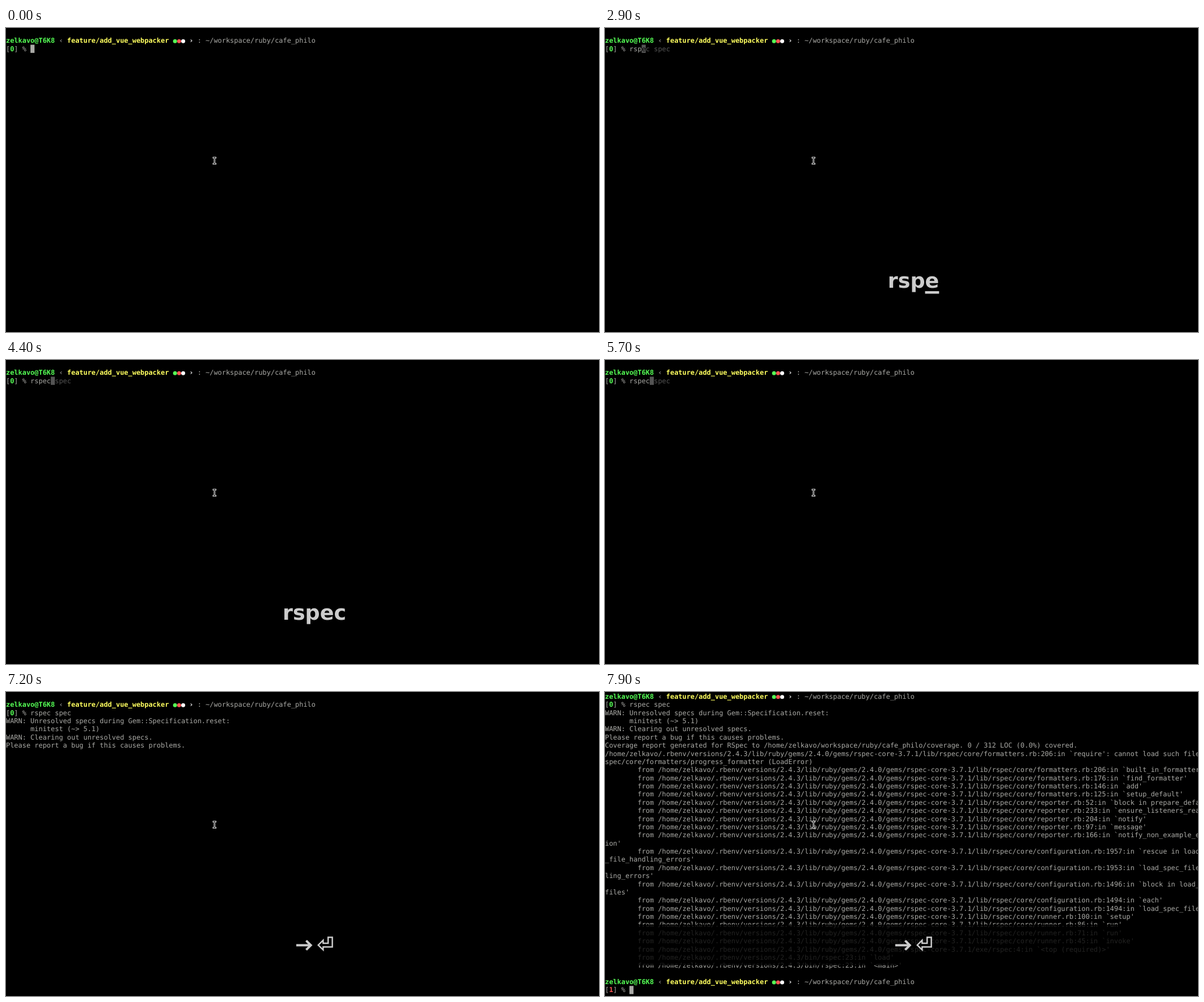
An HTML page with a canvas that plays this animation: 1046x536 px, repeating every 8 s.

```html
<!DOCTYPE html>
<html lang="en">
<head>
<meta charset="utf-8">
<title>Terminal session</title>
<style>
  html, body { margin: 0; width: 100%; height: 100%; overflow: hidden; background: #000; }
  canvas { display: block; }
</style>
</head>
<body>
<canvas id="stage" width="1046" height="536"></canvas>
<script>
const ctx = document.getElementById('stage').getContext('2d');
ctx.textRendering = 'geometricPrecision'; // unhinted glyphs and advances

const LOOP = 8000;
const CELL_W = 7.184, CELL_H = 14.375, TOP = 0.75, ASCENT = 11.2, COLUMNS = 151;
const MONO = '11.93px "DejaVu Sans Mono", monospace';
const KEY_SIZE = 36.5, KEY_CENTER = 544, KEY_BASE = 458.4;
const GREY = '#aaaaa6', DIM = '#545454', GREEN = '#5f5', YELLOW = '#ffff5f',
      RED = '#f55', WHITE = '#fff', KEY_COLOR = '#ccc';

const USER = 'zelkavo', HOST = 'T6K8';
const COMMAND = 'rspec spec';
const RUBY = `/home/${USER}/.rbenv/versions/2.4.3/`;
const GEM = RUBY + 'lib/ruby/gems/2.4.0/gems/rspec-core-3.7.1/';
const CORE = GEM + 'lib/rspec/core/';

const warnings = [
  'WARN: Unresolved specs during Gem::Specification.reset:',
  '      minitest (~> 5.1)',
  'WARN: Clearing out unresolved specs.',
  'Please report a bug if this causes problems.'
];

const coreCalls = [
  ['formatters', 206, 'built_in_formatter'],
  ['formatters', 176, 'find_formatter'],
  ['formatters', 146, 'add'],
  ['formatters', 125, 'setup_default'],
  ['reporter', 52, 'block in prepare_default'],
  ['reporter', 233, 'ensure_listeners_ready'],
  ['reporter', 204, 'notify'],
  ['reporter', 97, 'message'],
  ['reporter', 166, 'notify_non_example_exception'],
  ['configuration', 1957, 'rescue in load_spec_file_handling_errors'],
  ['configuration', 1953, 'load_spec_file_handling_errors'],
  ['configuration', 1496, 'block in load_spec_files'],
  ['configuration', 1494, 'each'],
  ['configuration', 1494, 'load_spec_files'],
  ['runner', 100, 'setup'],
  ['runner', 86, 'run'],
  ['runner', 71, 'run'],
  ['runner', 45, 'invoke']
].map(([file, line, name]) => `${CORE}${file}.rb:${line}:in \`${name}'`);

const calls = [
  ...coreCalls,
  GEM + "exe/rspec:4:in `<top (required)>'",
  RUBY + "bin/rspec:23:in `load'",
  RUBY + "bin/rspec:23:in `<main>'"
];

const wrap = line => line.match(new RegExp(`.{1,${COLUMNS}}`, 'g'));
const report = [
  ...warnings,
  `Coverage report generated for RSpec to /home/${USER}/workspace/ruby/cafe_philo/coverage. 0 / 312 LOC (0.0%) covered.`,
  CORE + "formatters.rb:206:in `require': cannot load such file -- rspec/core/formatters/progress_formatter (LoadError)",
  ...calls.map(call => ' '.repeat(8) + 'from ' + call)
].flatMap(wrap);

// Each step changes part of the state from its time on.
const steps = [
  [0, { typed: 0, cursor: true, keys: '', underline: false, phase: 'edit' }],
  [200, { cursor: false }],
  [800, { cursor: true }],
  [1400, { cursor: false }],
  [1500, { keys: 'r', underline: true }],
  [1700, { typed: 1, cursor: true, underline: false }],
  [1800, { keys: 'rs', underline: true }],
  [2000, { typed: 2 }],
  [2100, { underline: false }],
  [2400, { cursor: false }],
  [2900, { typed: 3, cursor: true, keys: 'rspe', underline: true }],
  [3000, { typed: 4 }],
  [3100, { underline: false }],
  [3300, { keys: 'rspec', underline: true }],
  [3400, { typed: 5, underline: false }],
  [3800, { cursor: false }],
  [4400, { cursor: true }],
  [5100, { cursor: false }],
  [5600, { keys: '' }],
  [5700, { cursor: true }],
  [6100, { keys: '→', underline: true }],
  [6200, { typed: 10, underline: false }],
  [6400, { keys: '→⏎', underline: true }],
  [6600, { phase: 'run', underline: false }],
  [7100, { cursor: false }],
  [7200, { phase: 'warn' }],
  [7600, { phase: 'done' }],
  [7900, { cursor: true }]
];

const rowTop = row => TOP + row * CELL_H;

function print(row, col, text, color = GREY, bold = false) {
  ctx.font = (bold ? 'bold ' : '') + MONO;
  ctx.fillStyle = color;
  [...text].forEach((char, i) => {
    if (char !== ' ') ctx.fillText(char, (col + i) * CELL_W, rowTop(row) + ASCENT);
  });
}

function block(row, col, color = GREY) {
  ctx.fillStyle = color;
  ctx.fillRect(col * CELL_W, rowTop(row), CELL_W, CELL_H);
}

function prompt(row, status, color) {
  print(row, 0, `${USER}@${HOST}`, GREEN, true);
  print(row, 13, '‹');
  print(row, 15, 'feature/add_vue_webpacker', YELLOW, true);
  [GREEN, RED, WHITE].forEach((dot, i) => {
    ctx.fillStyle = dot;
    ctx.beginPath();
    ctx.arc((41.5 + i) * CELL_W, rowTop(row) + 8.1, 3.5, 0, Math.PI * 2);
    ctx.fill();
  });
  print(row, 45, '›', WHITE, true);
  print(row, 47, ': ~/workspace/ruby/cafe_philo');
  print(row + 1, 0, '[ ] %');
  print(row + 1, 1, status, color, true);
}

function commandLine({ typed, cursor }) {
  const col = 6 + typed;
  const hint = typed ? COMMAND.slice(typed) : '';
  print(2, 6, COMMAND.slice(0, typed));
  print(2, col, hint, DIM);
  if (cursor) {
    block(2, col, hint ? DIM : GREY);
    print(2, col, hint.slice(0, 1), '#000');
  }
}

function terminal(state) {
  const { phase, cursor } = state;
  const first = phase === 'done' ? 0 : 1;
  prompt(first, '0', GREEN);
  if (phase === 'edit') return commandLine(state);

  print(first + 1, 6, COMMAND);
  if (phase === 'run') {
    if (cursor) block(3, 0);
    return;
  }
  const lines = phase === 'warn' ? warnings : report;
  lines.forEach((line, i) => print(first + 2 + i, 0, line));
  if (phase === 'done') {
    const last = lines.length + 3;
    prompt(last, '1', RED);
    if (cursor) block(last + 1, 6);
  }
}

function path(points, closed = false) {
  ctx.beginPath();
  points.forEach(([x, y]) => ctx.lineTo(x, y));
  if (closed) ctx.closePath();
  ctx.stroke();
}

function pointer() {
  for (const [color, width, grow] of [[WHITE, 2.7, 0.8], ['#000', 1, 0]]) {
    ctx.strokeStyle = color;
    ctx.lineWidth = width;
    path([[365.4 - grow, 228.6], [370.2 + grow, 228.6]]);
    path([[365.4 - grow, 239.4], [370.2 + grow, 239.4]]);
    path([[367.8, 228.6], [367.8, 239.4]]);
  }
}

function arrowKeys(keys, underline) {
  const pair = keys.length > 1;
  ctx.strokeStyle = KEY_COLOR;
  ctx.save();
  if (!pair) ctx.translate(18.7, 0);
  ctx.lineWidth = 4;
  path([[512, 446.5], [537, 446.5]]);
  path([[529.5, 438.3], [537.7, 446.5], [529.5, 454.7]]);
  ctx.restore();
  if (pair) {
    ctx.lineWidth = 2.5;
    path([[568.2, 432.4], [575.6, 432.4], [575.6, 449.4], [559.4, 449.4],
          [559.4, 454.6], [550.8, 446.2], [559.4, 437.8], [559.4, 443], [568.2, 443]], true);
  }
  if (underline) ctx.fillRect(pair ? 548 : 530, 459.5, 30, 3.5);
}

function keyOverlay({ keys, underline }) {
  if (!keys) return;
  ctx.fillStyle = 'rgba(0, 0, 0, 0.8)';
  ctx.fillRect(0, 410, 1046, 72);
  ctx.fillStyle = KEY_COLOR;
  if (keys[0] === '→') return arrowKeys(keys, underline);

  ctx.font = `bold ${KEY_SIZE}px "DejaVu Sans", sans-serif`;
  const width = ctx.measureText(keys).width;
  const left = KEY_CENTER - width / 2;
  ctx.fillText(keys, left, KEY_BASE);
  if (underline) {
    const lastWidth = ctx.measureText(keys.slice(-1)).width;
    ctx.fillRect(left + width - lastWidth, 464, lastWidth, 4.5);
  }
}

function draw(state) {
  ctx.fillStyle = '#000';
  ctx.fillRect(0, 0, 1046, 536);
  terminal(state);
  pointer();
  keyOverlay(state);
}

let start, shown = 0;
function tick(now) {
  start ??= now;
  const time = (now - start) % LOOP;
  const past = steps.filter(([at]) => at <= time);
  if (past.length !== shown) {
    shown = past.length;
    draw(Object.assign({}, ...past.map(([, change]) => change)));
  }
  requestAnimationFrame(tick);
}
requestAnimationFrame(tick);
</script>
</body>
</html>
```
